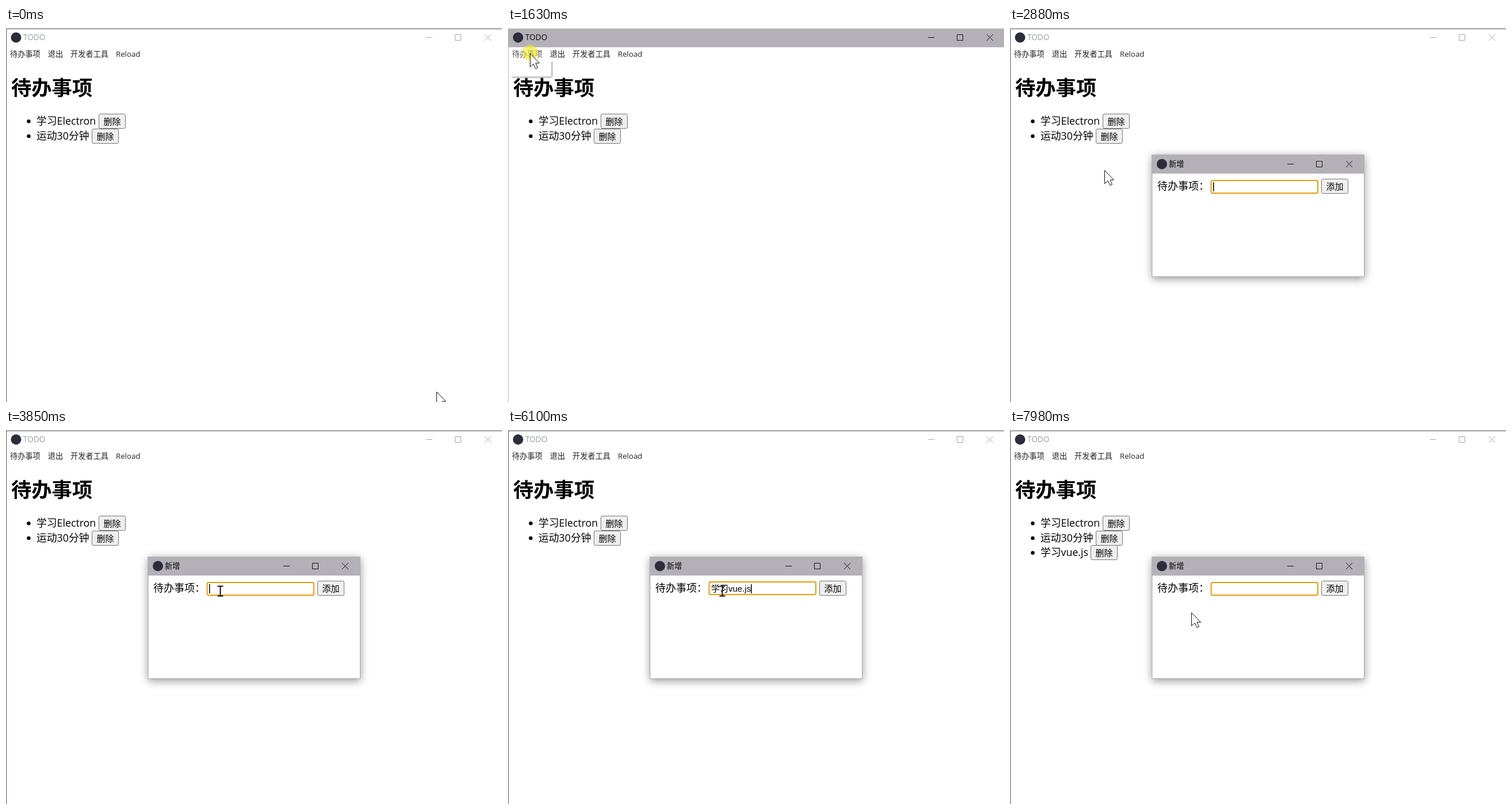
Recreate the animation shown at these times as an HTML page with a canvas. Size 862 by 650 pixels, loop 8000 ms.

```html
<!DOCTYPE html>
<html lang="zh-CN">
<head>
<meta charset="utf-8">
<title>TODO</title>
<style>
html, body { margin: 0; width: 100%; height: 100%; overflow: hidden; background: #fff; }
canvas { display: block; }
</style>
</head>
<body>
<canvas id="stage" width="862" height="650"></canvas>
<script>
const ctx = document.getElementById('stage').getContext('2d');
const LOOP = 8000, TICK = 68.3, BLINK = 530;
const UI = '"Open Sans", "Noto Sans CJK SC", "Noto Sans CJK", sans-serif';
const FIELD = '"Liberation Sans", "Noto Sans CJK SC", "Noto Sans CJK", sans-serif';
const BAR = '#b3b1b7', FRAME = '#55555a', LOGO = '#2b2e3a', INK = '#111';

// Moments of the story in ms
const ACTIVATE = 1300, MENU_OPEN = 1560, MENU_CLOSE = 2050, DIALOG = 2180, LOADED = 2530,
  FORM = 2740, COMPOSE = 4120, COMMIT = 4720, TYPE = 5450, PRESS_ADD = 7240, ADDED = 7380;

const START = { x: 748, y: 632 };
const GLIDES = [
  { from: 0, until: 205, x: 230, y: 234 },
  { from: 410, until: 1225, x: 38, y: 38 },
  { from: ACTIVATE, until: MENU_OPEN, x: 38, y: 44 },
  { from: 1700, until: 1900, x: 46, y: 72 },
  { from: 2600, until: 3340, x: 372, y: 280, bend: 110 },
  { from: 6500, until: 7370, x: 574, y: 278, bend: -45 },
  { from: ADDED, until: 7640, x: 261, y: 338, bend: 34 },
  { from: 7780, until: 7920, x: 315, y: 317 }
];
const ARROW = new Path2D('M0 0V23L5.5 18L9.5 26L13 24.5L9.5 16.5H16Z');
const BEAM = new Path2D('M-5-9H5M0-9V8M-5 8H5');

const between = (t, a, b) => t >= a && t < b;
const keysPressed = (t, start, gap, count) =>
  Math.max(0, Math.min(count, Math.floor((t - start) / gap) + 1));

function pointerAt(time) {
  const t = Math.floor((time + 5) / TICK) * TICK;
  let pos = START;
  for (const g of GLIDES) {
    if (t < g.from) break;
    const k = Math.min(1, (t - g.from) / (g.until - g.from));
    const arc = (g.bend || 0) * Math.sin(Math.PI * k);
    pos = { x: pos.x + (g.x - pos.x) * k, y: pos.y + (g.y - pos.y) * k + arc };
  }
  return pos;
}

// What the input holds, and when it last changed
function fieldAt(t) {
  if (t >= ADDED) return { value: '', changed: ADDED };
  if (t >= COMMIT) {
    const gap = 130, n = keysPressed(t, TYPE, gap, 6);
    return { value: '学习' + 'vue.js'.slice(0, n), changed: n ? TYPE + (n - 1) * gap : COMMIT };
  }
  const gap = 112, n = keysPressed(t, COMPOSE, gap, 5);
  const value = 'xue'.slice(0, n) + (n > 3 ? "'" + 'xi'.slice(0, n - 3) : '');
  return { value, keys: n, changed: n ? COMPOSE + (n - 1) * gap : FORM + 50 };
}

function rect(x, y, w, h, color) {
  ctx.fillStyle = color;
  ctx.fillRect(x, y, w, h);
}

function disc(x, y, r, color) {
  ctx.fillStyle = color;
  ctx.beginPath();
  ctx.arc(x, y, r, 0, 7);
  ctx.fill();
}

// Draws text around a vertical middle and returns its width
function text(str, x, cy, size, color = '#000', family = UI, weight = '') {
  ctx.font = `${weight} ${size}px ${family}`;
  ctx.fillStyle = color;
  ctx.fillText(str, x, cy + size * 0.345);
  return ctx.measureText(str).width;
}

function box(x, y, w, h, r, stroke, line, fill) {
  ctx.beginPath();
  ctx.roundRect(x, y, w, h, r);
  ctx.fillStyle = fill;
  ctx.fill();
  ctx.strokeStyle = stroke;
  ctx.lineWidth = line;
  ctx.stroke();
}

function button(label, x, y, hover) {
  box(x + 0.5, y + 0.5, 46, 25, 2.5, '#767676', 1, hover ? '#e5e5e5' : '#efefef');
  text(label, x + 8.5, y + 13.8, 15);
}

function controls(right, cy, color) {
  const min = right - 126.5, max = right - 76.5, close = right - 24.5;
  ctx.strokeStyle = color;
  ctx.lineWidth = 1;
  ctx.beginPath();
  ctx.moveTo(min - 5.5, cy);
  ctx.lineTo(min + 5.5, cy);
  ctx.rect(max - 5, cy - 5, 10, 10);
  for (const d of [-5.5, 5.5]) {
    ctx.moveTo(close - d, cy - 5.5);
    ctx.lineTo(close + d, cy + 5.5);
  }
  ctx.stroke();
}

function mainWindow(t) {
  const active = between(t, ACTIVATE, DIALOG), edge = active ? BAR : FRAME;
  rect(0, 0, 862, 650, '#fff');
  rect(0, 1, 862, active ? 32.5 : 1, edge);
  rect(0, 1, 1, 649, edge);
  disc(17.5, 16.5, 9, LOGO);
  text('TODO', 30, 16.8, 13.6, active ? INK : '#97a09c');
  controls(862, 16.5, active ? INK : '#a5a5a5');

  if (between(t, MENU_CLOSE, LOADED)) box(1.5, 34.5, 65, 21, 3, '#dedede', 1, '#dedede');
  let x = 7;
  for (const label of ['待办事项', '退出', '开发者工具', 'Reload']) {
    const dim = x === 7 && between(t, ACTIVATE, LOADED);
    x += text(label, x, 45.7, 13.2, dim ? '#4c4c4c' : '#222') + 13;
  }

  text('待办事项', 9, 104.5, 35.3, '#000', UI, 'bold');
  const items = ['学习Electron', '运动30分钟'];
  if (t >= ADDED) items.push('学习vue.js');
  items.forEach((label, i) => {
    const cy = 162 + i * 25.6;
    disc(39.5, cy + 0.3, 3.2, '#000');
    const width = text(label, 53, cy, 17.8);
    button('删除', Math.round(53 + width + 4.4), Math.round(cy - 12.8));
  });
}

function dropMenu(t) {
  if (!between(t, MENU_OPEN, MENU_CLOSE)) return;
  ctx.save();
  ctx.shadowColor = 'rgba(0,0,0,.55)';
  ctx.shadowBlur = 3;
  ctx.shadowOffsetX = ctx.shadowOffsetY = 1.5;
  rect(4, 56, 71.5, 28.5, '#fff');
  ctx.restore();
  if (t > MENU_OPEN + 220) rect(6, 59, 67, 23, '#e4e4e4');
  if (t > MENU_OPEN + 130) text('新增', 29, 70.5, 13.2, INK);
}

function candidates(phrase) {
  const words = phrase ? '学习 血洗 学系 血细 雪洗 学戏 学'.split(' ') : [...'学雪血薛穴削靴'];
  const step = phrase ? 56 : 44;
  box(353.5, 290.5, step * words.length, 41, 0, '#c8c8c8', 1, '#fff');
  rect(354, 291, step, 40, '#0078d7');
  words.forEach((word, i) => {
    const x = 359 + i * step;
    text(i + 1, x, 311, 12, i ? '#777' : '#fff');
    text(word, x + 12, 311, 17, i ? INK : '#fff');
  });
}

function dialog(t, pos) {
  if (t < DIALOG) return;
  ctx.save();
  if (t < DIALOG + TICK) ctx.globalAlpha = 0.6;
  ctx.save();
  ctx.shadowColor = 'rgba(0,0,0,.42)';
  ctx.shadowBlur = 14;
  ctx.shadowOffsetY = 3;
  rect(246.5, 220, 369.5, 212.5, '#aaa9ad');
  ctx.restore();
  rect(247.5, 253, 367.5, 178.5, '#fff');
  rect(246.5, 220, 369.5, 33, BAR);
  disc(264, 236.5, 9, LOGO);
  text(t < LOADED ? '添加事项' : '新增', 276, 236.9, 13.2);
  controls(614, 236.5, INK);
  if (t >= FORM) form(t, pos);
  ctx.restore();
}

function form(t, { x, y }) {
  const blurred = between(t, PRESS_ADD, ADDED);
  const top = between(t, COMMIT, PRESS_ADD) ? 264 : 265;
  text('待办事项：', 256, 275, 18);
  box(349.5, top, 185.5, 22, 2.5, blurred ? '#858585' : '#e59c10', blurred ? 1.5 : 2, '#fff');
  button('添加', 541, 262, between(x, 541, 588) && between(y, 262, 288));

  const { value, keys, changed } = fieldAt(t);
  const width = text(value, 353, 275.8, 15, '#000', FIELD);
  if (keys) {
    rect(353, 283, width, 1, '#000');
    candidates(keys > 3);
  }
  const lit = t >= changed && (t - changed) % (2 * BLINK) < BLINK;
  if (lit && !blurred) rect(353 + width, 268, 1.5, 16, '#000');
}

function pointer(t, { x, y }) {
  const press = (from, length = 200) => between(t, from, from + length);
  if (press(1230, 470) || press(1900) || press(3290) || press(PRESS_ADD))
    disc(x, y - 1, 13.5, 'rgba(243,235,30,.62)');
  const editing = t >= FORM && between(x, 349, 536) && between(y, 264, 288);
  ctx.save();
  ctx.translate(Math.round(x) + 0.5, Math.round(y) + 0.5);
  ctx.strokeStyle = INK;
  ctx.fillStyle = '#fff';
  ctx.lineWidth = editing ? 2 : 1;
  if (!editing) ctx.fill(ARROW);
  ctx.stroke(editing ? BEAM : ARROW);
  ctx.restore();
}

function draw() {
  const t = performance.now() % LOOP, pos = pointerAt(t);
  mainWindow(t);
  dropMenu(t);
  dialog(t, pos);
  pointer(t, pos);
  requestAnimationFrame(draw);
}
draw();
</script>
</body>
</html>
```
